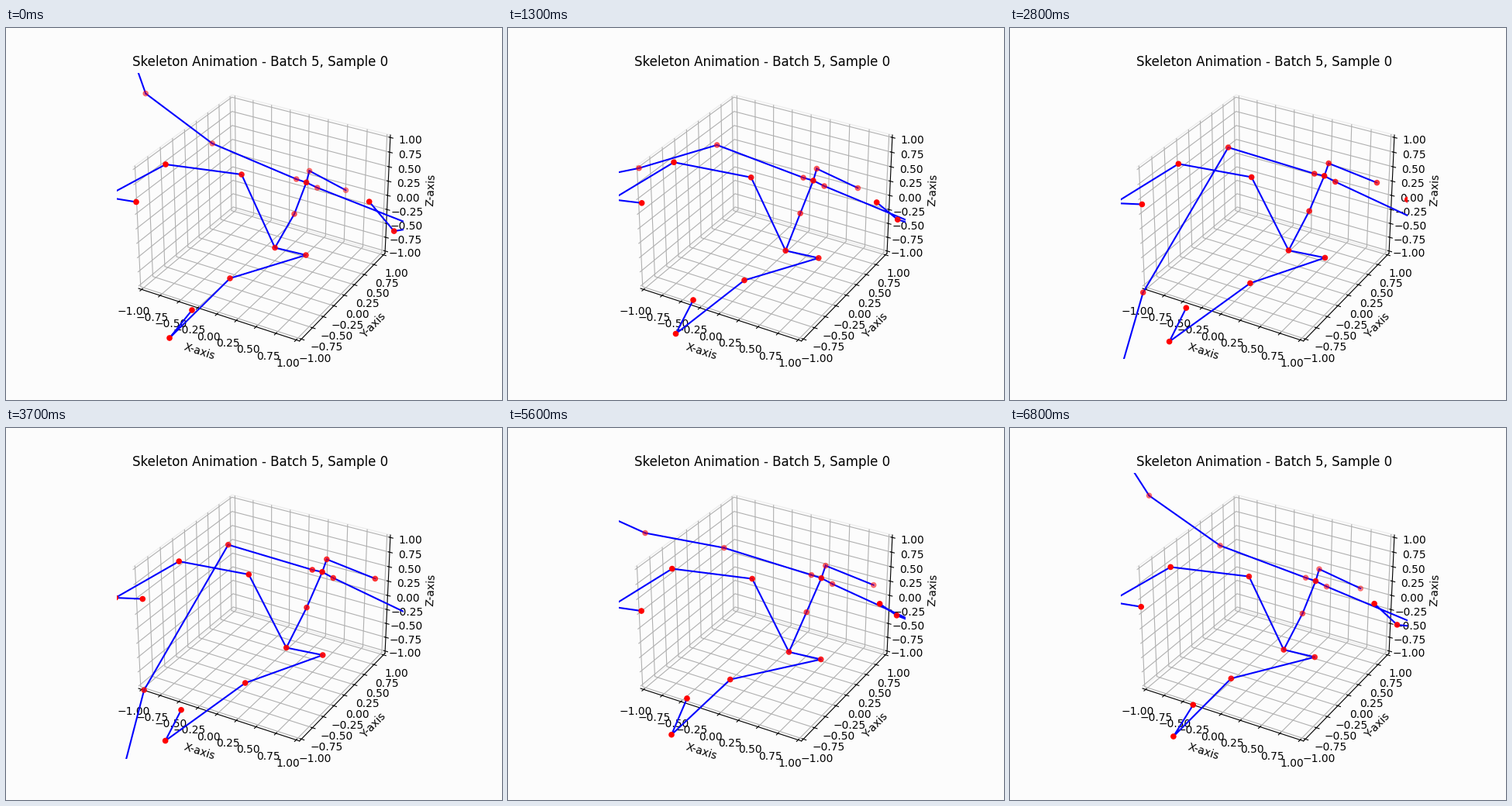
A matplotlib script for the animation above (6.9 s loop, 640x480 px).

```python
import numpy as np
import matplotlib.pyplot as plt
from matplotlib.animation import FuncAnimation

W, H, DPI = 640, 480, 100
FRAMES, STEP = 69, 100
PAPER = "#fcfcfc"

# Four shared movements, eased between a few key times (ms).
TIMES = np.array([0, 800, 1900, 3700, 4500, 5600, 6800.0])
MOVES = np.array([
    [0, .02, .59, .91, 1.02, .73, .3],  # sway: upper body leans right
    [0, .11, .73, 1, .73, .18, 0],      # lift: far arm swings down and back
    [0, .2, 1, 0, .3, .85, .4],         # bob: hips dip twice
    [0, .65, .67, .95, 1, 1, .4],       # drift: hips slide right
])
SLOPES = np.gradient(MOVES, TIMES, axis=1)

# Opacity of the joints that lie deeper in the box.
FAR = {"pelvis": .8, "spine": .55, "chest": .85, "neck": .45, "head": .4,
       "l_shoulder": .48, "r_shoulder": .48, "l_elbow": .45, "l_wrist": .45,
       "l_hip": .85, "r_hip": .78, "r_knee": .86, "r_wrist": .9}


def moves(t):
    """Cubic Hermite value of each movement at time t."""
    i = min(np.searchsorted(TIMES, t, side="right") - 1, len(TIMES) - 2)
    h = TIMES[i + 1] - TIMES[i]
    u = (t - TIMES[i]) / h
    s = u * u * (3 - 2 * u)
    bend = (1 - u) * SLOPES[:, i] - u * SLOPES[:, i + 1]
    return (1 - s) * MOVES[:, i] + s * MOVES[:, i + 1] + h * u * (1 - u) * bend


def skeleton(sway, lift, bob, drift):
    """Joint positions in stage pixels, and the bones that link them."""
    joints = {"pelvis": np.array([347 + 15.5 * drift, 283.5 + 6.5 * bob])}
    bones = []

    def grow(parent, name, dx, dy):
        joints[name] = joints[parent] + (dx, dy)
        bones.append((joints[parent], joints[name]))

    grow("pelvis", "spine", 25 + 16 * sway - 14 * drift,
         -43.5 - 4 * sway - 5 * drift)
    grow("spine", "chest", 15.5 + 5 * sway, -40.7 - 4 * sway - 1.5 * lift)
    grow("chest", "neck", 4 + 2 * sway, -15 - 1.5 * sway)
    grow("neck", "head", 47 + 17 * sway + 3 * bob, 25)

    grow("chest", "l_shoulder", -12.8, -4.3 + 1.5 * lift)
    grow("l_shoulder", "l_elbow", -108.5 - 5 * bob, -46 + 15 * sway)
    grow("l_elbow", "l_wrist", -86 - 14 * lift - 5 * bob - 9 * drift,
         -64.5 + 252 * lift)
    grow("l_wrist", "l_hand", -20.5 + 16 * lift - 14 * bob - 28 * drift,
         -58 + 178 * lift)

    grow("chest", "r_shoulder", 14.2, 6.8 + sway)
    grow("r_shoulder", "r_elbow", 130 - 11 * sway, 51 + 7 * sway)
    grow("r_elbow", "r_wrist", -31 + 16 * lift - 8 * bob - 4 * drift,
         5 - 10 * bob - 12 * drift)
    grow("r_wrist", "r_hand", -32 + 22 * sway + 14 * lift - 10 * bob,
         -38 + 27 * bob)

    grow("pelvis", "l_hip", -43 - 6 * sway, -94.5)
    grow("l_hip", "l_knee", -98 + 8 * lift - 8 * bob,
         -13 + 16 * sway - 9 * lift - 10 * drift)
    grow("l_knee", "l_ankle", -78 - 4 * lift, 42 + 5 * lift + 7 * bob)
    grow("l_ankle", "l_foot", 40 - 5 * lift, 6.5 - 5 * lift)

    grow("pelvis", "r_hip", 40 + 7 * lift, 9.5)
    grow("r_hip", "r_knee", -98 - 33 * sway + 28 * lift,
         30 + 6 * lift - 6 * bob)
    grow("r_knee", "r_ankle", -78 + 12 * sway - 36 * lift,
         77 + 14 * sway - 16 * drift)
    grow("r_ankle", "r_foot", 29 - 9 * drift, -36 - 8 * bob - 4 * drift)
    return joints, bones


fig = plt.figure(figsize=(W / DPI, H / DPI), dpi=DPI, facecolor=PAPER)
ax = fig.add_subplot(111, projection="3d", facecolor=PAPER)
ax.set_title("Skeleton Animation - Batch 5, Sample 0")
edge = 25 / 24
ax.set(xlim=(-edge, edge), ylim=(-edge, edge), zlim=(-edge, edge),
       xlabel="X-axis", ylabel="Y-axis", zlabel="Z-axis")
for axis in (ax.xaxis, ax.yaxis, ax.zaxis):
    axis.set_ticks(np.linspace(-1, 1, 9))
    axis.pane.set(facecolor=PAPER, edgecolor="#eeeeee", alpha=1)

# Flat layer over the square plot area, in stage pixels.
left, top, side = 143.2, 57.6, 369.6
layer = fig.add_axes([left / W, 1 - (top + side) / H, side / W, side / H])
layer.set(xlim=(left, left + side), ylim=(top + side, top))
layer.axis("off")
line, = layer.plot([], [], color="blue", lw=1.5)
dots = layer.scatter([], [], s=20, color="red", zorder=3)


def draw(n):
    sway, lift, bob, drift = moves(n * STEP)
    joints, bones = skeleton(sway, lift, bob, drift)
    gap = (np.nan, np.nan)
    line.set_data(*np.array([p for a, b in bones for p in (a, b, gap)]).T)
    fade = (1 - lift / 2) * np.array([1 - FAR.get(j, 1) for j in joints])
    dots.set_offsets(list(joints.values()))
    dots.set_color([(1, 0, 0, np.clip(1 - f, .3, 1)) for f in fade])
    return line, dots


anim = FuncAnimation(fig, draw, frames=FRAMES, interval=STEP, repeat=True,
                     repeat_delay=0)
plt.show()
```
